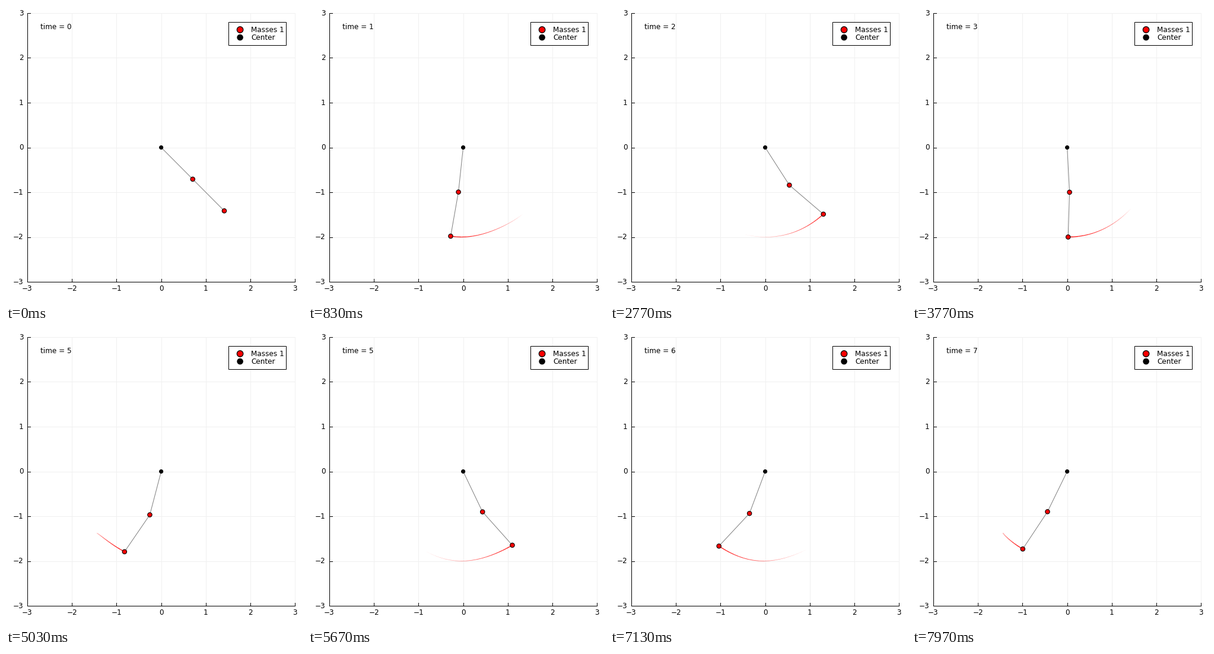
A matplotlib script for the animation above (8000 ms loop, 499 by 499 pixels).

```python
import numpy as np
import matplotlib.pyplot as plt
from matplotlib.animation import FuncAnimation
from matplotlib.collections import LineCollection
from matplotlib.patches import Circle, Rectangle

SIZE, DPI = 499, 100
STEPS, LOOP_MS = 240, 8000
TICKS = 2 * STEPS
DT, SUBSTEPS = 0.03, 20
GRAVITY = 9.81
TRAIL = 20
PT = 72 / DPI  # points per pixel


def accel(s):
    """State derivative of a double pendulum with unit masses and rods."""
    a, b, va, vb = s
    d = a - b
    den = 2 - np.cos(d) ** 2
    fa = -vb ** 2 * np.sin(d) - 2 * GRAVITY * np.sin(a)
    fb = va ** 2 * np.sin(d) - GRAVITY * np.sin(b)
    return np.array([va, vb,
                     (fa - np.cos(d) * fb) / den,
                     (2 * fb - np.cos(d) * fa) / den])


def rk4(s, h):
    k1 = accel(s)
    k2 = accel(s + h / 2 * k1)
    k3 = accel(s + h / 2 * k2)
    k4 = accel(s + h * k3)
    return s + h / 6 * (k1 + 2 * k2 + 2 * k3 + k4)


def simulate():
    s = np.array([np.pi / 4, np.pi / 4, 0.0, 0.0])
    angles = []
    for _ in range(STEPS):
        angles.append(s[:2])
        for _ in range(SUBSTEPS):
            s = rk4(s, DT / SUBSTEPS)
    return np.array(angles)


def px(x):
    return 261.6 + 75.2 * x


def py(y):
    return 238.5 - 75.55 * y


angles = simulate()
sx, cy = np.sin(angles), -np.cos(angles)
bob = np.column_stack([px(sx[:, 0]), py(cy[:, 0])])
tip = np.column_stack([px(sx.sum(axis=1)), py(cy.sum(axis=1))])

fig = plt.figure(figsize=(SIZE / DPI, SIZE / DPI), dpi=DPI, facecolor="white")
ax = fig.add_axes([0, 0, 1, 1])
ax.set_xlim(0, SIZE)
ax.set_ylim(SIZE, 0)
ax.axis("off")


def line(xs, ys, width=1.0, **kw):
    return ax.plot(xs, ys, lw=width * PT, **kw)[0]


def dot(x, y, radius, face, z, edge=1.1):
    return ax.add_patch(Circle((x, y), radius, fc=face, ec="black",
                               lw=edge * PT, zorder=z))


def label(x, y, text, ha="left"):
    return ax.text(x, y, text, ha=ha, va="baseline", fontsize=12 * PT,
                   family="DejaVu Sans", color="black", zorder=6)


left, right, top, bottom = px(-3), px(3), py(3), py(-3)
for v in range(-3, 4):
    x, y = px(v), py(v)
    name = str(v).replace("-", "\u2212")
    line([x, x], [top, bottom], color="#f0f0f0", zorder=0)
    line([left, right], [y, y], color="#f0f0f0", zorder=0)
    line([x, x], [bottom, bottom - 5], color="black", zorder=1)
    line([left, left + 5], [y, y], color="black", zorder=1)
    label(x, 479.6, name, "center")
    label(29.4, y + 3.8, name, "right")
line([left, left], [top, bottom], color="black", zorder=1)
line([left, right], [bottom, bottom], color="black", zorder=1)

ax.add_patch(Rectangle((374.8, 26.8), 97, 39, fc="white", ec="black",
                       lw=PT, zorder=5))
dot(394.6, 40, 5.2, "red", 6, 1.3)
dot(394.6, 53, 4.7, "black", 6)
label(413.3, 44, "Masses 1")
label(413.3, 57, "Center")

clock = label(58, 38.6, "time = 0")
rods = line([], [], color="#808080", zorder=2)
trail = LineCollection([], zorder=3, capstyle="butt")
ax.add_collection(trail, autolim=False)
masses = [dot(0, 0, 3.7, "red", 4) for _ in range(2)]
dot(px(0), py(0), 3.0, "black", 4)


def update(tick):
    # two ticks per step: each step is held around its nominal time
    n = min((tick + 1) // 2, STEPS - 1)
    # round() sends exact halves to the even second
    clock.set_text(f"time = {round(round(n * DT, 6))}")
    joints = np.array([[px(0), py(0)], bob[n], tip[n]])
    rods.set_data(joints[:, 0], joints[:, 1])
    for mass, pos in zip(masses, joints[1:]):
        mass.set_center(pos)

    path = tip[max(0, n - TRAIL + 1):n + 1]
    fade = np.linspace(0, 1, TRAIL)[TRAIL - len(path) + 1:]
    trail.set_segments(list(np.stack([path[:-1], path[1:]], axis=1)))
    trail.set_color([(1, 0, 0, f) for f in fade])
    trail.set_linewidth([(0.4 + 0.9 * f) * PT for f in fade] or [PT])
    return clock, rods, trail, *masses


anim = FuncAnimation(fig, update, frames=TICKS, interval=LOOP_MS / TICKS,
                     repeat=True, repeat_delay=0, blit=False)
plt.show()
```
